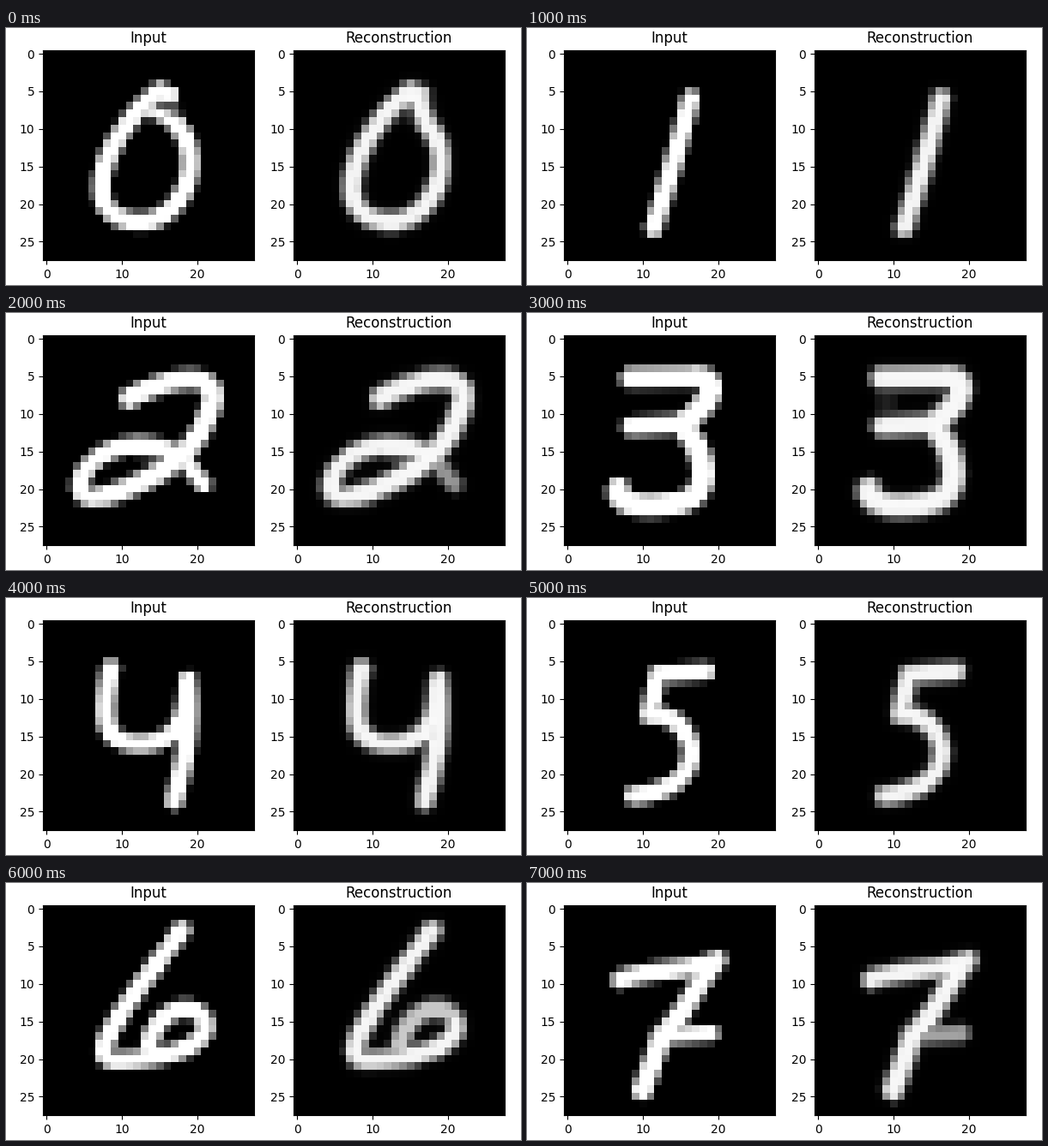
Write a matplotlib script that moves like this. It is 600 by 300 pixels and loops after 8 s.

```python
import matplotlib.pyplot as plt
import numpy as np
from matplotlib.animation import FuncAnimation

W, H = 600, 300
SIZE = 28
SIDE, TOP = 245.6, 25.7
ROWS, COLS = np.mgrid[0:SIZE, 0:SIZE]
STEPS = np.linspace(0, 1, 90)[:, None]


def bezier(points):
    """Bezier curve of any degree, by repeated interpolation."""
    layer = [np.array(p, float) for p in points]
    while len(layer) > 1:
        layer = [a + STEPS * (b - a) for a, b in zip(layer, layer[1:])]
    return layer[0]


def stroke(*points, width=1.2, ink=1.0, recall=0.98):
    """Distance field of a curve, with its level in each of the two views."""
    path = bezier(points)
    dist = np.hypot(COLS[..., None] - path[:, 0], ROWS[..., None] - path[:, 1])
    return width - dist.min(axis=2), ink, recall


def blur(img):
    wide = np.pad(img, 1)
    rows = (wide[:-2] + wide[1:-1] + wide[2:]) / 3
    return (rows[:, :-2] + rows[:, 1:-1] + rows[:, 2:]) / 3


def render(strokes):
    """Crisp input and its softer reconstruction."""
    crisp = [ink * np.clip(0.5 + depth / 0.95, 0, 1) for depth, ink, _ in strokes]
    soft = [level * np.clip(0.52 + depth / 1.2, 0, 1) for depth, _, level in strokes]
    soft = np.max(soft, axis=0)
    return np.max(crisp, axis=0), 0.9 * soft + 0.1 * blur(soft)


def zero():
    top, base, shoulder = (15, 5), (12.5, 22.4), (17, 9.2)
    return [stroke(top, (7.3, 11), (3.5, 22.3), base),
            stroke(base, (18, 22.3), (21.5, 14), shoulder),
            stroke(shoulder, (16.5, 7), top, ink=0.3),
            stroke(top, (16.5, 5.5), width=1.1),
            stroke(shoulder, (14.5, 7.9), width=0.9, recall=0.2)]


def one():
    return [stroke((16.3, 6), (14.3, 14), (11.4, 23.2))]


def two():
    neck, foot, arch, cross = (21.2, 10.5), (7.5, 21), (12, 14.3), (18, 15.8)
    return [stroke((11, 8), (15, 5.5), (25, 3), neck, width=1.35),
            stroke(neck, (19.5, 16), (13, 19.5), foot, width=1.35),
            stroke(foot, (1.5, 22.5), (5, 14), arch),
            stroke(arch, (15, 14.3), cross, width=1.3),
            stroke(cross, (20.8, 19.4), width=1.1, recall=0.6)]


def three():
    bend, waist, base = (16.5, 5.2), (15, 11.4), (13, 22.1)
    bold = 1.5
    return [stroke((8.4, 5.3), bend, width=1.4),
            stroke(bend, (20.5, 5), (19.5, 8.5), waist, width=bold),
            stroke((8.5, 11.7), waist, width=1.3),
            stroke(waist, (18.5, 15), (20, 22), base, width=bold),
            stroke(base, (9, 22.6), (6.3, 21.8), (6.7, 20), width=bold),
            stroke((9, 6), (9, 11), ink=0, recall=0.13)]


def four():
    middle = (13, 16)
    return [stroke((8.5, 6), (7, 14), (8, 16.2), middle),
            stroke(middle, (18, 15.5), (18.5, 12), (18.7, 7.6)),
            stroke((18.8, 9), (19.3, 15), (17.8, 20), (16.9, 23.6))]


def five():
    corner, waist = (12, 6.8), (10.8, 12.2)
    return [stroke((18.3, 6.4), corner),
            stroke(corner, waist),
            stroke(waist, (17, 11.5), (20, 22), (8.8, 22.9))]


def six():
    base, side = (9.5, 20.2), (21.1, 15.5)
    return [stroke((17.9, 2.9), (12, 11), (4, 20.5), base),
            stroke(base, (14, 20.2), (21, 19), side),
            stroke(side, (20.5, 12), (14.2, 12.8), (13.6, 18.5), recall=0.8)]


def seven():
    corner, knee = (19.8, 6.9), (12.4, 17)
    return [stroke((7, 9.5), (11, 8), (16, 8.5), corner),
            stroke(corner, (17, 10), (16, 13.5), knee, width=1.3),
            stroke(knee, (11.5, 20), (9.9, 24.2), width=1.35),
            stroke(knee, (19, 16.6), width=1.1, recall=0.65)]


digits = (zero, one, two, three, four, five, six, seven)
pairs = [render(digit()) for digit in digits]

fig = plt.figure(figsize=(W / 100, H / 100), dpi=100)
views = []
for left, title, img in zip((43, 335), ("Input", "Reconstruction"), pairs[0]):
    ax = fig.add_axes([left / W, 1 - (TOP + SIDE) / H, SIDE / W, SIDE / H])
    views.append(ax.imshow(img, cmap="gray", vmin=0, vmax=1))
    ax.set_title(title)


def update(i):
    for view, img in zip(views, pairs[i]):
        view.set_data(img)
    return views


anim = FuncAnimation(fig, update, frames=len(pairs), interval=1000,
                     repeat=True, repeat_delay=0)
plt.show()
```
